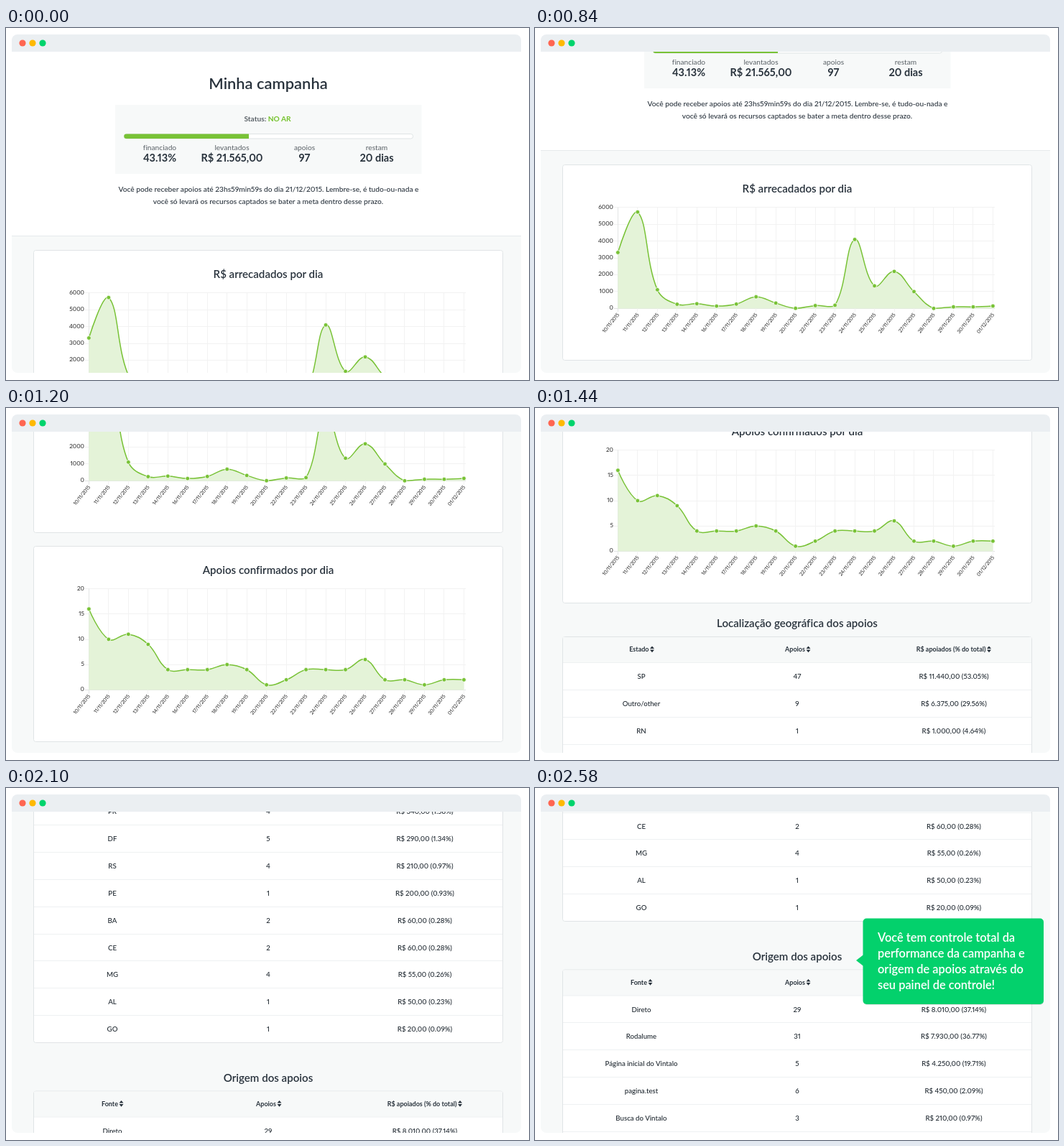
Recreate the animation shown at these times as an HTML page. Size 728 px wide and 490 px high, loop 2980 ms.

```html
<!DOCTYPE html>
<html lang="pt-BR">
<head>
<meta charset="utf-8">
<title>Minha campanha</title>
<style>
html, body { margin: 0; width: 100%; height: 100%; overflow: hidden; background: #fff; }
svg { display: block; width: 728px; height: 490px; }
text {
  font-family: Lato, "Open Sans", sans-serif; fill: #28323c;
  font-variant-numeric: proportional-nums; font-variant-ligatures: none;
}
.mid { text-anchor: middle; }
.end { text-anchor: end; }
.h1 { font-size: 21.9px; font-weight: 600; }
.h2 { font-size: 15.1px; font-weight: 600; }
.status { font-size: 10.2px; font-weight: 700; fill: #5c6369; }
.status tspan { fill: #74c22c; }
.label { font-size: 10.2px; fill: #596066; }
.value { font-size: 14.5px; font-weight: 700; }
.body { font-size: 10.2px; font-weight: 500; }
.cell { font-size: 9.7px; font-weight: 500; fill: #1f2830; }
.head { font-size: 9px; font-weight: 700; }
.axis { font-size: 8.2px; font-weight: 500; fill: #333; }
.date { font-size: 7px; font-weight: 500; letter-spacing: -.2px; fill: #333; }
.tip { font-size: 16.4px; font-weight: 600; fill: #fff; }
.card { fill: #fff; stroke: #e0e4e6; }
.rule { stroke: #eef1f2; }
</style>
</head>
<body>
<svg viewBox="0 0 728 490" xmlns="http://www.w3.org/2000/svg">
  <defs>
    <clipPath id="view"><path d="M8 33H717V472a8 8 0 0 1-8 8H16a8 8 0 0 1-8-8z"/></clipPath>
  </defs>
  <g clip-path="url(#view)"><g id="page"></g></g>
  <path d="M8 33V17a8 8 0 0 1 8-8H709a8 8 0 0 1 8 8V33z" fill="#ebeff2"/>
  <circle cx="23" cy="21" r="4.6" fill="#ff6651"/>
  <circle cx="37" cy="21" r="4.6" fill="#ffb901"/>
  <circle cx="51" cy="21" r="4.6" fill="#00d46c"/>
  <g id="bubble" opacity="0"></g>
</svg>
<script>
const LOOP = 2980, STEP = 30;
const GREEN = '#78c236', PALE = '#f7f9f9', GRID = '#f2f2f2', AXIS = '#e2e4e4';
const page = document.getElementById('page');
const bubble = document.getElementById('bubble');
const parts = [];
const add = s => parts.push(s);

const text = (cls, x, y, s, extra = '') =>
  add(`<text class="${cls}" x="${x}" y="${y}" ${extra}>${s}</text>`);
const rect = (x, y, w, h, attrs) =>
  add(`<rect x="${x}" y="${y}" width="${w}" height="${h}" ${attrs}/>`);
const line = (x1, y1, x2, y2, attrs) =>
  add(`<path d="M${x1} ${y1}L${x2} ${y2}" ${attrs}/>`);
const crisp = v => Math.round(v) + 0.5;

function summary() {
  text('h1 mid', 365, 85, 'Minha campanha');
  rect(152, 107, 426.5, 96, `fill="${PALE}"`);
  text('status mid', 364, 130, 'Status: <tspan>NO AR</tspan>');
  rect(164.5, 147.5, 402, 6.5, 'rx="3" fill="#fff" stroke="#dfe4e5"');
  add(`<path d="M338 147.5H167.5a3.2 3.2 0 0 0 0 6.5H338z" fill="${GREEN}"/>`);
  [[214, 'financiado', '43.13%'], [314.5, 'levantados', 'R$ 21.565,00'],
   [415.5, 'apoios', '97'], [516, 'restam', '20 dias']].forEach(([x, label, value]) => {
    text('label mid', x, 170, label);
    text('value mid', x, 186, value);
  });
  text('body mid', 365.5, 228, 'Você pode receber apoios até 23hs59min59s do dia 21/12/2015. Lembre-se, é tudo-ou-nada e');
  text('body mid', 365, 245, 'você só levará os recursos captados se bater a meta dentro desse prazo.');
}

const dates = [10, 11, 12, 13, 14, 16, 17, 18, 19, 20, 22, 23, 24, 25, 26, 27, 28, 29, 30]
  .map(d => d + '/11/2015').concat('01/12/2015');

// Spline whose handles follow the neighbours, kept inside the plot
function smooth(pts, lo, hi, tension = 0.4) {
  const clamp = y => Math.min(hi, Math.max(lo, y));
  const handles = pts.map(([x, y], i) => {
    const a = pts[i - 1], b = pts[i + 1];
    if (!a || !b) return [x, y, x, y];
    const d1 = Math.hypot(x - a[0], y - a[1]), d2 = Math.hypot(b[0] - x, b[1] - y);
    const f1 = tension * d1 / (d1 + d2), f2 = tension * d2 / (d1 + d2);
    const dx = b[0] - a[0], dy = b[1] - a[1];
    return [x - f1 * dx, clamp(y - f1 * dy), x + f2 * dx, clamp(y + f2 * dy)];
  });
  return 'M' + pts[0] + pts.slice(1).map((p, i) => {
    const out = handles[i], inn = handles[i + 1];
    return `C${out[2]} ${out[3]} ${inn[0]} ${inn[1]} ${p}`;
  }).join('');
}

function chart(top, title, max, tick, data) {
  const left = 115.4, gap = 522 / 19, y0 = top + 59.6, y1 = top + 200.4;
  rect(38.5, top + 0.5, 653, 272, 'rx="3" class="card"');
  text('h2 mid', 365, top + 39, title);
  for (let v = 0; v <= max; v += tick) {
    const y = y1 - (y1 - y0) * v / max;
    line(110, crisp(y - 0.5), 640, crisp(y - 0.5), `stroke="${v ? GRID : AXIS}"`);
    text('axis end', 109, y + 2, v);
  }
  const pts = data.map((v, i) => [left + i * gap, y1 - (y1 - y0) * v / max]);
  pts.forEach(([x], i) => {
    line(crisp(x - 0.5), y0, crisp(x - 0.5), y1 + 5, `stroke="${i ? GRID : AXIS}"`);
    text('date end', 0, 0, dates[i], `transform="translate(${x + 2.1} ${y1 + 9}) rotate(-51)"`);
  });
  const curve = smooth(pts, y0, y1);
  add(`<path d="${curve}V${y1}H${left}z" fill="#e4f3d8"/>`);
  add(`<path d="${curve}" fill="none" stroke="${GREEN}" stroke-width="1.5"/>`);
  pts.forEach(([x, y]) =>
    add(`<circle cx="${x}" cy="${y}" r="2.9" fill="${GREEN}" stroke="#fff" stroke-width=".8"/>`));
}

function table(top, title, first, firstX, rows, bottom) {
  const pitch = 37.86, body = top + 36;
  text('h2 mid', 365, top - 14, title);
  rect(38.5, top - 0.5, 653, bottom - top, 'rx="3" class="card"');
  rect(39, top, 652, 35.5, `fill="${PALE}"`);
  line(39, body - 0.5, 691, body - 0.5, 'class="rule"');
  [[firstX, first], [380.5, 'Apoios'], [632, 'R$ apoiados (% do total)']].forEach(([x, s]) => {
    text('head end', x - 4.5, top + 20, s);
    add(`<path d="M${x - 3} ${top + 16}h6l-3-3.6zM${x - 3} ${top + 17.6}h6l-3 3.6z" fill="#28323c"/>`);
  });
  rows.forEach((row, i) => {
    const y = body + 18.6 + i * pitch;
    row.split('|').forEach((s, c) => text('cell mid', [148, 365, 583][c], y + 3.4, s));
    const edge = crisp(body + (i + 1) * pitch - 1);
    if (edge < bottom - 2) line(39, edge, 691, edge, 'class="rule"');
  });
}

summary();
rect(8, 290, 709, 1700, `fill="${PALE}"`);
line(8, 289.5, 717, 289.5, 'stroke="#e6eaec"');
chart(309, 'R$ arrecadados por dia', 6000, 1000,
  [3320, 5720, 1110, 250, 280, 140, 260, 690, 320, 10, 170, 190, 4090, 1340, 2195, 1000, 5, 95, 95, 145]);
chart(600, 'Apoios confirmados por dia', 20, 5,
  [16, 10, 11, 9, 4, 4, 4, 5, 4, 1, 2, 4, 4, 4, 6, 2, 2, 1, 2, 2]);
table(920, 'Localização geográfica dos apoios', 'Estado', 163, [
  'SP|47|R$ 11.440,00 (53.05%)',
  'Outro/other|9|R$ 6.375,00 (29.56%)',
  'RN|1|R$ 1.000,00 (4.64%)',
  'SC|8|R$ 910,00 (4.22%)',
  'RJ|8|R$ 555,00 (2.57%)',
  'PR|4|R$ 340,00 (1.58%)',
  'DF|5|R$ 290,00 (1.34%)',
  'RS|4|R$ 210,00 (0.97%)',
  'PE|1|R$ 200,00 (0.93%)',
  'BA|2|R$ 60,00 (0.28%)',
  'CE|2|R$ 60,00 (0.28%)',
  'MG|4|R$ 55,00 (0.26%)',
  'AL|1|R$ 50,00 (0.23%)',
  'GO|1|R$ 20,00 (0.09%)'
], 1486);
table(1553.5, 'Origem dos apoios', 'Fonte', 160.5, [
  'Direto|29|R$ 8.010,00 (37.14%)',
  'Rodalume|31|R$ 7.930,00 (36.77%)',
  'Página inicial do Vintalo|5|R$ 4.250,00 (19.71%)',
  'pagina.test|6|R$ 450,00 (2.09%)',
  'Busca do Vintalo|3|R$ 210,00 (0.97%)'
], 1900);
page.innerHTML = parts.splice(0).join('');

rect(457, 182.5, 251, 119.5, 'rx="5" fill="#000" opacity=".12"');
rect(456.5, 181.5, 251.5, 119.5, 'rx="5" fill="#03d16c"');
add('<path d="M458 231.5L447 240L458 248.5z" fill="#03d16c"/>');
['Você tem controle total da', 'performance da campanha e',
 'origem de apoios através do', 'seu painel de controle!']
  .forEach((s, i) => text('tip', 477, 214 + i * 22, s));
bubble.innerHTML = parts.splice(0).join('');

const steps = (t, from, count) =>
  Math.max(0, Math.min(count, Math.floor((t - from) / STEP + 1e-6) + 1));
const backOut = p => 1 + 2.70158 * (p - 1) ** 3 + 1.70158 * (p - 1) ** 2;

function draw(t) {
  const k = steps(t, 720, 54);
  const scroll = k ? Math.round(1300 - 24.1 * (54 - k)) : 0;
  page.setAttribute('transform', `translate(0 ${-scroll})`);
  const p = steps(t, 2340, 9) / 9;
  bubble.setAttribute('opacity', Math.min(1, p * 2));
  bubble.setAttribute('transform', `translate(0 ${-63 * (1 - backOut(p))})`);
}

const start = performance.now();
function tick() {
  draw((performance.now() - start) % LOOP);
  requestAnimationFrame(tick);
}
tick();
</script>
</body>
</html>
```
